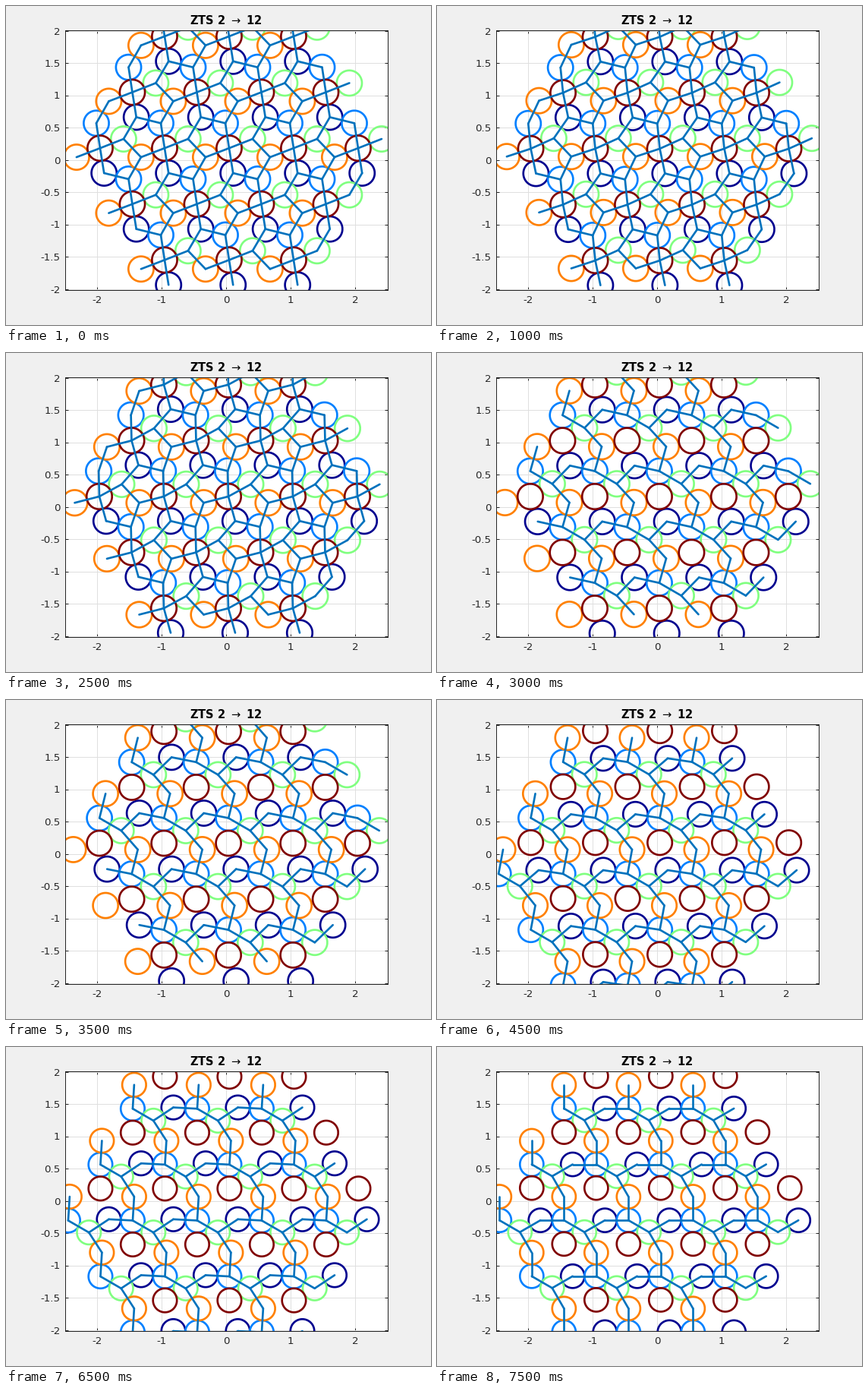
A matplotlib script that plays this animation: 560x420 px, repeating every 8000 ms.

```python
import numpy as np
import matplotlib.pyplot as plt
from matplotlib.animation import FuncAnimation
from matplotlib.collections import LineCollection

W, H, DPI = 560, 420, 80
PT = 72 / DPI  # points per pixel
FRAMES, CONTACT, WRAP = 16, 6, 9
COLORS = ["#00008f", "#0080ff", "#80ff80", "#ff8000", "#800000"]
INK = "#262626"

# The plane is treated as complex numbers: a triangular lattice with unit spacing.
E0, E1 = 1, np.exp(1j * np.pi / 3)
CENTRE = 0.047 + 0.181j
CELLS = np.array([i * E0 + j * E1 for i in range(-2, 3) for j in range(-2, 3)
                  if abs(i + j) <= 2])
RING = np.exp(1j * np.linspace(0, 2 * np.pi, 73))


def u(deg):
    return np.exp(1j * np.radians(deg))


def link(e, v):
    """Length L for which |e + L v| = L."""
    b, c = (e * np.conj(v)).real, abs(v) ** 2 - 1
    return (-b - np.sqrt(b * b - c)) / c


def pinned(beta):
    """Linkage with the hub disk held by four neighbours."""
    lo, hi = 5.0, 28.0
    for _ in range(40):
        gamma = (lo + hi) / 2
        arm = u(180 + gamma)
        size = link(E0, arm - u(30 - beta))
        if link(E1, arm - u(90 + beta)) > size:
            lo = gamma
        else:
            hi = gamma
    angles = np.array([-60 - gamma, 90 + beta, 30 - beta, 180 + gamma])
    return np.append(size * u(angles), 0), size


def loose(phi):
    """Linkage after the hub disk has lost its bonds."""
    psi = np.degrees(np.arcsin(np.sin(np.radians(30 + phi)) - 0.5))
    size = 1 / (u(-30) + u(30 + phi) + u(-psi)).real
    return np.array([size * u(180 - psi) + E0 - E1, 0, size * u(-30),
                     size * u(90 - phi) - E1, size * u(-90)]), size


def xy(z):
    return np.stack([z.real, z.imag], axis=-1)


def state(k):
    free = k >= CONTACT
    basis, size = loose(1.75 * (15 - k)) if free else pinned(8.6 * (1 - k / CONTACT))
    basis = basis + CENTRE - basis.mean()
    if k >= WRAP:
        basis[1:3] -= E1
    disks = basis[:, None] + CELLS
    nodes = disks[:4].ravel() if free else disks.ravel()
    gap = abs(nodes[:, None] - nodes)
    a, b = np.nonzero(np.triu(gap < 1.005 * size, 1))
    return disks, size / 2, np.stack([nodes[a], nodes[b]], axis=1)


plt.rcParams["font.family"] = "DejaVu Sans"
plt.rcParams["mathtext.fontset"] = "dejavusans"

fig = plt.figure(figsize=(W / DPI, H / DPI), dpi=DPI, facecolor="#f0f0f0")
ax = fig.add_axes([77.5 / W, 46.5 / H, 425 / W, 342 / H])
ax.set(xlim=(-2.5, 2.5), ylim=(-342 / 170, 342 / 170))
xt, yt = np.arange(-2, 3), np.arange(-2, 2.5, 0.5)
ax.set_xticks(xt, [f"{v:g}" for v in xt])
ax.set_yticks(yt, [f"{v:g}" for v in yt])
ax.tick_params(direction="in", top=True, right=True, length=4.3 * PT, width=PT,
               color=INK, labelcolor=INK, labelsize=13.33 * PT)
ax.tick_params(axis="x", pad=7.5 * PT)
ax.tick_params(axis="y", pad=6 * PT)
ax.grid(color="#dfdfdf", linewidth=PT)
ax.set_axisbelow(True)
for side in ax.spines.values():
    side.set(color=INK, linewidth=PT)
fig.text(290 / W, 1 - 24 / H, r"ZTS 2 $\rightarrow$ 12", ha="center",
         va="baseline", weight="bold", size=14.67 * PT, color="black")

line_width = 2.67 * PT
rings = [ax.add_collection(LineCollection([], colors=c, linewidths=line_width, zorder=2),
                           autolim=False) for c in COLORS]
bonds = ax.add_collection(LineCollection([], colors="#0072bd", linewidths=line_width,
                                         capstyle="round", zorder=2.2), autolim=False)


def update(k):
    disks, radius, pairs = state(k)
    for ring, row in zip(rings, disks):
        ring.set_segments(xy(row[:, None] + radius * RING))
    bonds.set_segments(xy(pairs))
    return [*rings, bonds]


anim = FuncAnimation(fig, update, frames=FRAMES, interval=500, repeat=True,
                     repeat_delay=0, blit=False)
plt.show()
```
